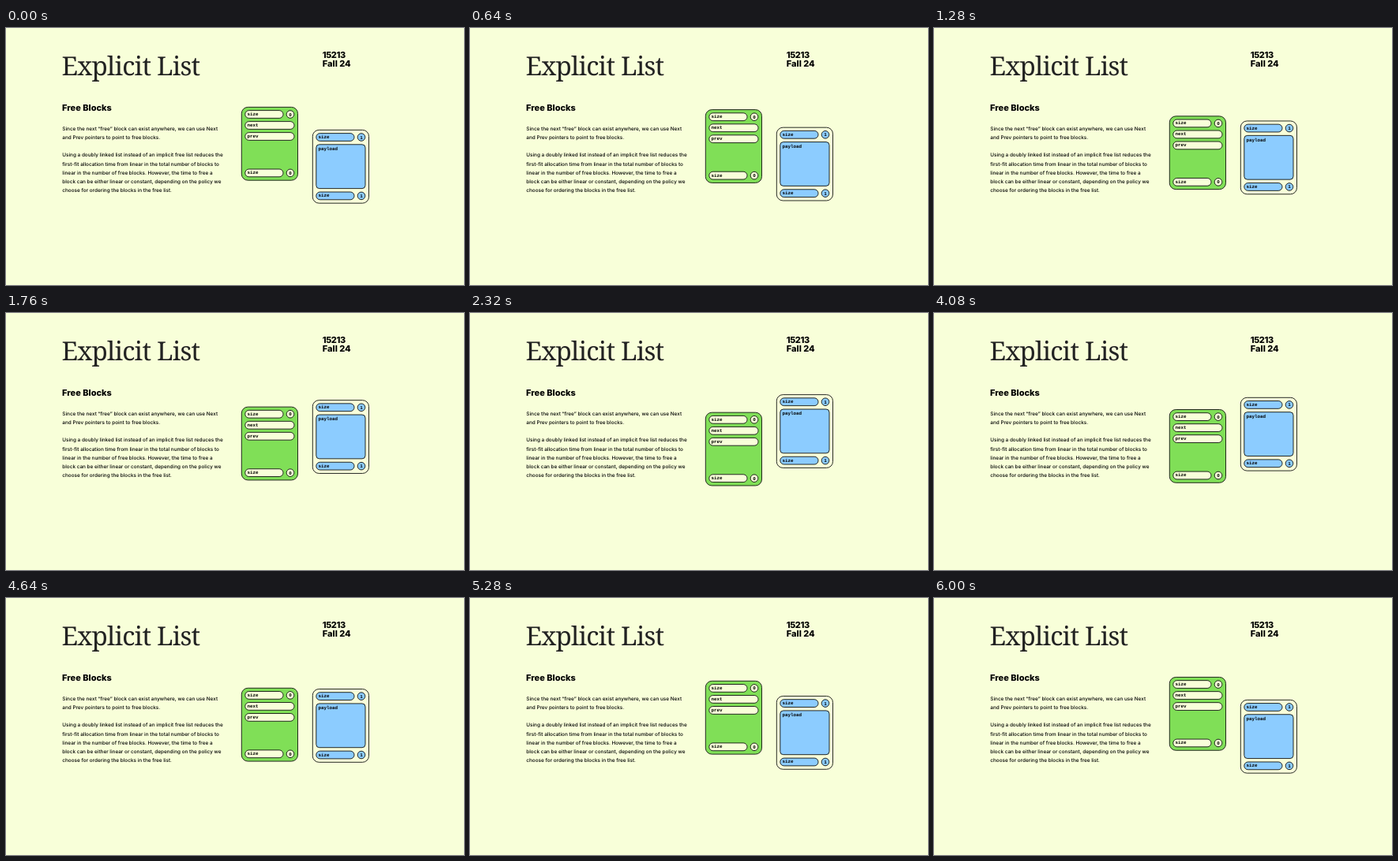
These frames come from a looping animation (580 px wide and 326 px high, 6080 ms). An HTML page:

```html
<!DOCTYPE html>
<html lang="en">
<head>
<meta charset="utf-8">
<title>Explicit List</title>
<style>
  html, body { margin: 0; width: 100%; height: 100%; overflow: hidden; background: #f8ffd9; }
  svg { display: block; width: 580px; height: 326px; }
  text { fill: #000; text-rendering: geometricPrecision; white-space: pre; }
  .title { font: 500 33px "Noto Serif", serif; letter-spacing: -0.8px; fill: #222; }
  .head { font: 800 11px Inter, sans-serif; }
  .body { font: 500 6.4px Inter, sans-serif; }
  .code { font: 700 5.9px "Liberation Mono", monospace; }
  .mid { text-anchor: middle; }
  .card * { stroke-width: 0.9; }
  .card rect, .card circle { stroke: #111; }
</style>
</head>
<body>
<svg id="stage" viewBox="0 0 580 326"></svg>
<script>
const CREAM = "#f8ffd9", GREEN = "#80df57", BLUE = "#8cccff";
const LOOP = 6080, STEP = 80, LEG = 2960, TRAVEL = 29;
const stage = document.getElementById("stage");

function add(parent, tag, attrs, content = "") {
  const el = document.createElementNS("http://www.w3.org/2000/svg", tag);
  for (const key in attrs) el.setAttribute(key, attrs[key]);
  el.textContent = content;
  return parent.appendChild(el);
}

function write(parent, cls, x, y, content) {
  return add(parent, "text", { class: cls, x, y }, content);
}

function box(parent, x, y, width, height, rx, fill) {
  add(parent, "rect", { x, y, width, height, rx, fill });
}

function field(card, y, width, label, fill) {
  box(card, 4.8, y, width, 9.8, 4.9, fill);
  write(card, "code", 7.4, y + 6.4, label);
}

function sizeRow(card, y, bit, fill) {
  field(card, y, 48.2, "size", fill);
  add(card, "circle", { cx: 62, cy: y + 4.9, r: 4.8, fill });
  write(card, "code mid", 62, y + 6.9, bit);
}

function makeCard(fill, inner, bit) {
  const card = add(stage, "g", { class: "card" });
  box(card, 0.3, 0.4, 71.2, 92.8, 8, fill);
  sizeRow(card, 4.6, bit, inner);
  sizeRow(card, 79, bit, inner);
  return card;
}

write(stage, "title", 70.5, 59.5, "Explicit List");
write(stage, "head", 400.8, 37.5, "15213").style.letterSpacing = "-0.4px";
write(stage, "head", 400.8, 48.6, "Fall 24");
write(stage, "head", 71, 104.5, "Free Blocks");

[
  "Since the next “free” block can exist anywhere, we can use Next",
  "and Prev pointers to point to free blocks.",
  "",
  "Using a doubly linked list instead of an implicit free list reduces the",
  "first-fit allocation time from linear in the total number of blocks to",
  "linear in the number of free blocks. However, the time to free a",
  "block can be either linear or constant, depending on the policy we",
  "choose for ordering the blocks in the free list."
].forEach((line, i) => write(stage, "body", 71.3, 130 + i * 11.15, line));

const freeCard = makeCard(GREEN, CREAM, "0");
field(freeCard, 18.6, 62.2, "next", CREAM);
field(freeCard, 32.6, 62.2, "prev", CREAM);

const usedCard = makeCard(CREAM, BLUE, "1");
box(usedCard, 4.8, 18.8, 62.2, 55.8, 4, BLUE);
write(usedCard, "code", 7.4, 26.2, "payload");

// Out, a short rest at the far end, and back.
function shift(t) {
  const p = Math.min(t, LOOP - t, LEG) / LEG;
  return TRAVEL * (1 - Math.cos(Math.PI * p)) / 2;
}

function draw(now) {
  const t = Math.floor((now % LOOP) / STEP) * STEP;
  const d = shift(t);
  freeCard.setAttribute("transform", `translate(298 ${100 + d})`);
  usedCard.setAttribute("transform", `translate(388 ${129 - d})`);
}

function tick() {
  draw(performance.now() - start);
  requestAnimationFrame(tick);
}

const start = performance.now();
tick();
</script>
</body>
</html>
```
